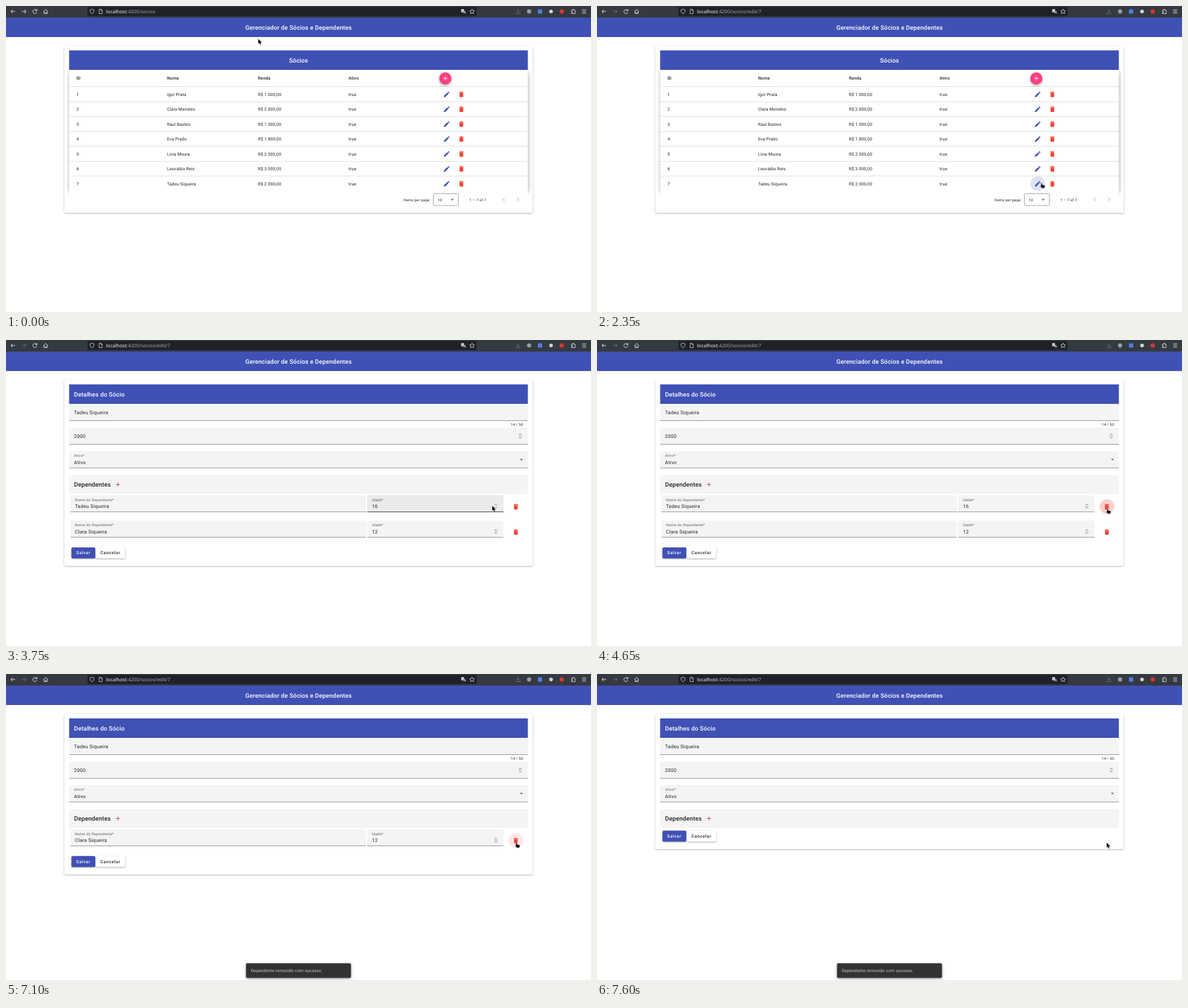
An HTML page with a canvas for the animation above (8 s loop, 959x503 px).

```html
<!DOCTYPE html>
<html lang="pt-BR">
<head>
<meta charset="utf-8">
<title>Gerenciador de Sócios e Dependentes</title>
<style>
html, body { margin: 0; width: 100%; height: 100%; overflow: hidden; background: #fff; }
canvas { display: block; width: 959px; height: 503px; }
</style>
</head>
<body>
<canvas id="stage" width="959" height="503"></canvas>
<script>
const ctx = document.getElementById('stage').getContext('2d');
const LOOP = 8000, STEP = 50;
const BLUE = '#3f51b5', PINK = '#ff4081', RED = '#f44336', INK = 'rgba(0,0,0,.87)', MUTED = 'rgba(0,0,0,.6)';
const FIELD = '#f4f4f4', LINE = '#959595', LEFT = 103.5, WIDTH = 752;

const members = [
  ['Igor Prata', '1.000,00'], ['Clara Meireles', '2.000,00'], ['Raul Bastos', '1.500,00'],
  ['Eva Prado', '1.800,00'], ['Lívia Moura', '2.500,00'], ['Leocádio Reis', '3.000,00'],
  ['Tadeu Siqueira', '2.000,00']
];
const dependents = [['Tadeu Siqueira', '16'], ['Clara Siqueira', '12']];

const icons = {
  edit: 'M3 17.25V21h3.75L17.81 9.94l-3.75-3.75L3 17.25zM20.71 7.04c.39-.39.39-1.02 0-1.41l-2.34-2.34c-.39-.39-1.02-.39-1.41 0l-1.83 1.83 3.75 3.75 1.83-1.83z',
  trash: 'M6 19c0 1.1.9 2 2 2h8c1.1 0 2-.9 2-2V7H6v12zM19 4h-3.5l-1-1h-5l-1 1H5v2h14V4z',
  plus: 'M19 13h-6v6h-2v-6H5v-2h6V5h2v6h6v2z',
  prev: 'M15.41 7.41L14 6l-6 6 6 6 1.41-1.41L10.83 12z',
  next: 'M10 6L8.59 7.41 13.17 12l-4.58 4.59L10 18l6-6z'
};
for (const key in icons) icons[key] = new Path2D(icons[key]);
const arrowShape = new Path2D('M0 0V8.3L1.9 6.5 3.2 9.4 4.7 8.7 3.4 5.9H6Z');
const handShape = new Path2D('M.3.6Q1.2-.4 2 .6V3L5.9 3.7Q6.8 4 6.6 5L6 8.3H1.9L-.5 5.4Q-.6 4.3.5 4.7Z');

// [time, x, y, cursor, glides from the previous stop]
const stops = [
  [0, 413.5, 54, 'arrow'], [200, 413.5, 54, 'arrow'], [600, 602, 243, 'arrow', 1],
  [950, 602, 243, 'arrow'], [1300, 743, 287, 'arrow', 1], [1450, 727.5, 291, 'hand', 1],
  [2700, 727.5, 291, 'arrow'], [3150, 728, 291.3, 'arrow'], [3300, 765, 279, 'beam'],
  [3400, 792, 277, 'beam'], [3750, 797, 272.5, 'arrow'], [3950, 827, 277, 'hand'],
  [4100, 835.5, 277.3, 'hand'], [4850, 835.5, 277.3, 'arrow'], [5150, 835.5, 277.3, 'hand'],
  [7350, 835.5, 277.3, 'arrow']
];

function box(x, y, w, h, color, radius = 0) {
  ctx.fillStyle = color;
  ctx.beginPath();
  ctx.roundRect(x, y, w, h, radius);
  ctx.fill();
}
function disc(x, y, r, color) {
  ctx.fillStyle = color;
  ctx.beginPath();
  ctx.arc(x, y, r, 0, Math.PI * 2);
  ctx.fill();
}
function shadowed(blur, dy, alpha, draw) {
  ctx.save();
  ctx.shadowColor = `rgba(0,0,0,${alpha})`;
  ctx.shadowBlur = blur;
  ctx.shadowOffsetY = dy;
  draw();
  ctx.restore();
}
// y is the middle of the capital letters
function text(s, x, y, size, { color = INK, weight = 400, spacing = .0179, align = 'left', font = 'Roboto' } = {}) {
  ctx.font = `${weight} ${size}px "${font}", sans-serif`;
  ctx.letterSpacing = spacing * size + 'px';
  ctx.textRendering = 'geometricPrecision';
  ctx.textAlign = align;
  ctx.fillStyle = color;
  ctx.fillText(s, x, y + size * .356);
}
function icon(name, x, y, color, scale = .5) {
  ctx.save();
  ctx.translate(x, y);
  ctx.scale(scale, scale);
  ctx.translate(-12, -12);
  ctx.fillStyle = color;
  ctx.fill(icons[name]);
  ctx.restore();
}
function stroke(path, color, width = 1) {
  ctx.strokeStyle = color;
  ctx.lineWidth = width;
  ctx.stroke(new Path2D(path));
}
function caret(x, y) {
  ctx.fillStyle = 'rgba(0,0,0,.6)';
  ctx.fill(new Path2D(`M${x - 2.6} ${y - 1.2}h5.2l-2.6 2.6z`));
}

function browserBar(editing) {
  const light = '#dfe1e4', dim = '#686d73';
  box(0, 0, 959, 19, '#343a40');
  box(133.5, 1.5, 638, 15, '#1e2227', 2);
  stroke('M15 9H8M11 6L8 9L11 12', light);
  stroke('M26 9H33M30 6L33 9L30 12', editing ? dim : light);
  stroke('M50 7.2A3.3 3.3 0 1 0 50.5 10M50.8 5V7.8H48', light);
  stroke('M61.5 9L65 5.6L68.5 9M62.5 8.4V12.4H67.5V8.4M65 12V10', light);
  stroke('M141 5.2L144.3 6.3C144.5 10 143 12 141 13C139 12 137.5 10 137.7 6.3Z', light, .8);
  stroke('M152.7 5.4H156L157.7 7.2V12.6H152.7ZM155.8 5.4V7.4H157.7', light, .8);
  const url = { font: 'Noto Sans', spacing: 0 };
  text('localhost', 164, 8.8, 8, { ...url, color: '#f5f5f6' });
  const used = ctx.measureText('localhost').width;
  text(':4200/socios' + (editing ? '/edit/7' : ''), 164 + used, 8.8, 8, { ...url, color: '#a5a8ac' });
  box(746, 5, 5, 5.5, '#b4b7ba', .5);
  stroke('M747 7H750M748.5 6V9M750.5 12.5L752.2 8L754 12.5M751 11H753.5', light, .7);
  stroke('M764 5L765.2 7.6L768 7.9L765.9 9.8L766.5 12.6L764 11.2L761.5 12.6L762.1 9.8L760 7.9L762.8 7.6Z', light, .8);
  stroke('M839.5 5V10M837.3 8L839.5 10.2L841.7 8M836.3 10.5V12.5H842.7V10.5', dim);
  disc(857.5, 9, 3.4, '#9a9ea3');
  box(872, 5.5, 7, 7, '#4a7fe0');
  disc(893.5, 9, 3, '#d3d5d8');
  disc(911, 9, 3.5, '#e0342f');
  stroke('M927 7H929V5.5H931V7H933V12.5H927V10.8H928.5V9H927Z', light, .9);
  stroke('M944.5 6.3H951M944.5 9H951M944.5 11.7H951', light, .9);
}

function shell(bottom) {
  box(0, 19, 959, 32, BLUE);
  text('Gerenciador de Sócios e Dependentes', 479.5, 35, 10, { color: '#fff', weight: 500, spacing: .0125, align: 'center' });
  shadowed(3, 1, .3, () => box(95.5, 65.5, 768, bottom - 65.5, '#fff', 2));
}

function listPage(t, cursor) {
  shell(340);
  box(LEFT, 73, WIDTH, 32, BLUE);
  text('Sócios', 479.5, 89, 10, { color: '#fff', weight: 500, spacing: .0125, align: 'center' });
  shadowed(7, 2.5, .4, () => box(LEFT, 105, WIDTH, 199.5, '#fff'));
  box(LEFT, 304, WIDTH, 28, '#fff');
  const columns = [115.5, 264, 413, 561.5];
  ['ID', 'Nome', 'Renda', 'Ativo'].forEach((s, i) => text(s, columns[i], 118.7, 7, { weight: 500 }));
  shadowed(4, 2, .35, () => disc(720.2, 119, 10, PINK));
  icon('plus', 720.2, 119, '#fff');

  if (cursor.kind === 'hand') {
    const onEdit = cursor.x < 734.5;
    const alpha = t >= 2350 ? .17 : .04;
    disc(onEdit ? 722.5 : 746.5, 292, 12, onEdit ? `rgba(63,81,181,${alpha})` : 'rgba(244,67,54,.04)');
  }
  members.forEach(([name, income], i) => {
    const y = 145.2 + i * 24.5;
    box(LEFT, Math.round(y - 13), WIDTH, 1, 'rgba(0,0,0,.12)');
    [String(i + 1), name, 'R$ ' + income, 'true'].forEach((s, k) => text(s, columns[k], y, 7));
    icon('edit', 722.5, y, BLUE);
    icon('trash', 746.5, y, RED);
  });

  const small = { spacing: .0333 };
  text('Items per page:', 651.7, 318.5, 6, small);
  ctx.strokeStyle = '#a3a3a3';
  ctx.lineWidth = 1;
  ctx.beginPath();
  ctx.roundRect(700.5, 308.5, 41, 19.5, 2);
  ctx.stroke();
  text('10', 707.7, 318.7, 6, small);
  caret(731.5, 318.5);
  text('1 – 7 of 7', 759.6, 318.5, 6, small);
  icon('prev', 816, 318.3, 'rgba(0,0,0,.2)', .58);
  icon('next', 839.5, 318.3, 'rgba(0,0,0,.2)', .58);
}

function field(x, y, w, value, { label, indent = 8, fill = FIELD, line = LINE } = {}) {
  box(x, y, w, 28, fill, [2, 2, 0, 0]);
  box(x, y + 27, w, 1, line);
  if (label) text(label, x + indent, y + 7.5, 6, { color: MUTED, spacing: .03125 });
  text(value, x + indent, y + (label ? 18.3 : 14.3), 8, { spacing: .03125 });
}
function spinner(x, y) {
  box(x - 3, y - 4.5, 6, 9, '#e6e6e6', 1);
  stroke(`M${x - 1.8} ${y - 1.3}l1.8 -1.8l1.8 1.8M${x - 1.8} ${y + 1.3}l1.8 1.8l1.8 -1.8`, '#777', .8);
}
function button(x, y, w, label, fill, color) {
  shadowed(2.5, 1, .35, () => box(x, y - 9, w, 18, fill, 2));
  text(label, x + 7.8, y, 7, { color, weight: 500, spacing: .0893 });
}

function detailPage(t, cursor) {
  const rows = t < 4850 ? dependents : t < 7350 ? dependents.slice(1) : [];
  const grow = rows.length * 41.75;
  shell(287.7 + grow);
  box(LEFT, 73, WIDTH, 32, BLUE);
  text('Detalhes do Sócio', 111.5, 89, 10, { color: '#fff', weight: 500, spacing: .0125 });
  field(LEFT, 105, WIDTH, 'Tadeu Siqueira');
  text('14 / 50', 847.7, 139, 6, { spacing: .0333, align: 'right' });
  field(LEFT, 144, WIDTH, '2000');
  spinner(843, 158);
  field(LEFT, 182.8, WIDTH, 'Ativo', { label: 'Ativo*' });
  caret(845, 196.7);
  box(LEFT, 222, WIDTH, 31, FIELD);
  text('Dependentes', 111.5, 237.7, 10, { weight: 500, spacing: .0125 });
  icon('plus', 183.5, 237.5, '#c0466f', .48);

  rows.forEach(([name, age], i) => {
    const y = 255 + i * 41.75, first = i === 0;
    field(105.5, y, 484.5, name, { label: 'Nome do Dependente*', indent: 7.5 });
    field(592, y, 223.5, age, {
      label: 'Idade*',
      fill: first && t < 3950 ? '#ebebeb' : FIELD,
      line: first && t >= 3300 && t < 3950 ? '#3a3a3a' : LINE
    });
    spinner(803, y + 18);
    if (first && cursor.kind === 'hand') {
      const pressed = t >= 7100 ? .12 : t >= 4650 && t < 4850 ? .25 : .03;
      disc(836, 273.8, 12, `rgba(244,67,54,${pressed})`);
    }
    icon('trash', 835.8, y + 19, RED);
  });
  button(107.3, 266.4 + grow, 39, 'Salvar', BLUE, '#fff');
  button(147, 266.4 + grow, 48.5, 'Cancelar', '#fff', INK);
}

function snackbar(t) {
  if (t < 4850) return;
  let shown = 1;
  if (t < 5000 || (t >= 7350 && t < 7500)) shown = .5;
  else if (t >= 7500 && t < 7600) shown = .9;
  const scale = .8 + .2 * shown;
  ctx.save();
  ctx.globalAlpha = shown;
  ctx.translate(479.5, 487.5);
  ctx.scale(scale, scale);
  ctx.translate(-479.5, -487.5);
  shadowed(4, 1.5, .4, () => box(393.5, 475.5, 172, 24, '#323232', 2));
  text('Dependente removido com sucesso.', 401.4, 487.8, 7, { color: 'rgba(255,255,255,.75)' });
  ctx.restore();
}

function cursorAt(t) {
  const i = stops.findLastIndex(s => s[0] <= t);
  let [start, x, y, kind] = stops[i];
  const next = stops[i + 1];
  if (next && next[4]) {
    const p = (t - start) / (next[0] - start), e = p * p * (3 - 2 * p);
    x += (next[1] - x) * e;
    y += (next[2] - y) * e;
  }
  const overAction = Math.hypot(x - 722.5, y - 292) < 12 || Math.hypot(x - 746.5, y - 292) < 12;
  if (t < 1450 && overAction) kind = 'hand';
  return { x, y, kind };
}
function drawCursor({ x, y, kind }) {
  ctx.save();
  ctx.translate(x, y);
  if (kind === 'beam') {
    stroke('M-1.8 -4.5H1.8M0 -4.5V4.5M-1.8 4.5H1.8', '#111', .9);
  } else {
    const shape = kind === 'hand' ? handShape : arrowShape;
    ctx.lineJoin = 'round';
    ctx.lineWidth = 1;
    ctx.strokeStyle = '#fff';
    ctx.stroke(shape);
    ctx.fillStyle = '#0a0a0a';
    ctx.fill(shape);
  }
  ctx.restore();
}

function render(now) {
  const t = Math.floor((now % LOOP) / STEP) * STEP;
  const cursor = cursorAt(t);
  box(0, 0, 959, 503, '#fff');
  (t < 2700 ? listPage : detailPage)(t, cursor);
  browserBar(t >= 2350);
  snackbar(t);
  drawCursor(cursor);
}

const begin = performance.now();
function tick() {
  render(performance.now() - begin);
  requestAnimationFrame(tick);
}
tick();
</script>
</body>
</html>
```
